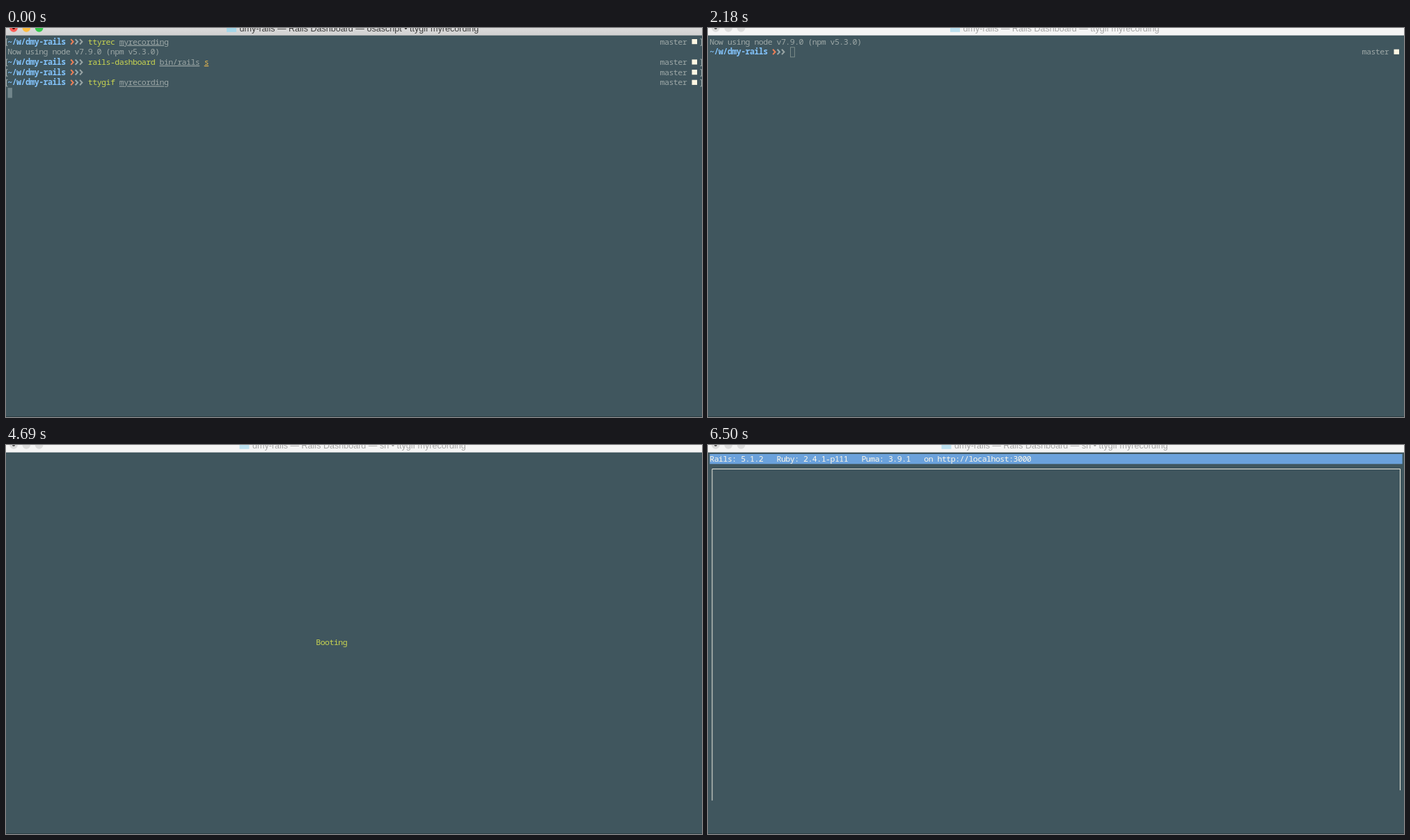
Write an HTML page that moves like this. It is 1000 px wide and 560 px high and loops after 8 s.

```html
<!DOCTYPE html>
<html lang="en">
<head>
<meta charset="utf-8">
<title>Terminal session</title>
<style>
  html, body { margin: 0; width: 100%; height: 100%; overflow: hidden; background: #40565e; }
  svg { display: block; width: 1000px; height: 560px; }
  text { white-space: pre; }
  #screen text {
    font: 500 11.6px "Noto Sans Mono", "DejaVu Sans Mono", monospace;
    letter-spacing: calc(6.42px - .6em);
  }
  #bar text { font: 12.57px "Liberation Sans", Arial, sans-serif; }
  .plain { fill: #9da8a7; }
  #screen .path { fill: #83c3fb; font-weight: 600; }
  .cmd { fill: #c9d551; }
  .arg { fill: #9da8a7; text-decoration: underline; }
  .opt { fill: #e9b84f; text-decoration: underline; }
  .head { fill: #fdf8ea; }
</style>
</head>
<body>
<svg viewBox="0 0 1000 560">
  <defs>
    <linearGradient id="chrome" x2="0" y2="1">
      <stop stop-color="#dadada"/><stop offset="1" stop-color="#d1d1d1"/>
    </linearGradient>
  </defs>
  <rect width="1000" height="560" fill="#40565e"/>
  <rect y="559" width="1000" height="1" fill="#2c3d43"/>
  <g id="screen"></g>
  <g id="bar"></g>
</svg>
<script>
const LOOP = 8000;
const COL = 6.42, ROW = 14.68, LEFT = 2.5, TOP = 12.7;
const x = col => LEFT + col * COL;
const y = row => TOP + row * ROW;

// Glyphs are set tight, so each starts a little left of its cell
const text = (col, row, cls, str) =>
  `<text class="${cls}" x="${x(col) - .25}" y="${y(row) + 11}">${str}</text>`;
const line = (d, color, width = 1) =>
  `<path d="${d}" fill="none" stroke="${color}" stroke-width="${width}"/>`;
const rect = (left, top, w, h, fill) =>
  `<rect x="${left}" y="${top}" width="${w}" height="${h}" fill="${fill}"/>`;

const chevron = (col, row, color) =>
  line(`M${x(col) + .8} ${y(row) + 3.4}l3.4 3.7l-3.4 3.7`, color, 2);
const prompt = row => text(0, row, 'path', '~/w/dmy-rails') +
  ['#ec7f57', '#93abb2', '#98a4a4'].map((c, i) => chevron(14 + i, row, c)).join('');
const branch = row => text(146, row, 'plain', 'master') +
  rect(985.5, y(row) + 3.3, 7.5, 7.2, '#fdf6e3');
const marks = row => line(
  `M2.5 ${y(row) + 3}H.5v9.5h2M997.5 ${y(row) + 3}h2v9.5h-2`, '#a3b0b0');
const fullPrompt = row => prompt(row) + branch(row) + marks(row);
const cursor = (col, row) =>
  `<rect x="${x(col) + .5}" y="${y(row) + .4}" width="5.8" height="14" fill="none" stroke="#82928f" stroke-width=".9"/>`;

const launch = row => text(18, row, 'cmd', 'rails-dashboard') +
  text(34, row, 'arg', 'bin/rails') + text(44, row, 'opt', 's');
const nodeInfo = row => text(0, row, 'plain', 'Now using node v7.9.0 (npm v5.3.0)');
const booting = dots => text(69, 18, 'cmd', 'Booting' + '.'.repeat(dots));

// The frame's sides are drawn row by row, the left one ahead of the right
const dashboard = (leftRows, rightRows) =>
  rect(LEFT, 13, 155 * COL, 14.3, '#6ba2dc') +
  text(0, 0, 'head', 'Rails: 5.1.2   Ruby: 2.4.1-p111   Puma: 3.9.1   on http://localhost:3000') +
  line(`M6 ${y(leftRows)}V34.5H994.5V${y(rightRows)}`, '#e9e8dd');

const history = fullPrompt(0) + text(18, 0, 'cmd', 'ttyrec') + text(25, 0, 'arg', 'myrecording') +
  nodeInfo(1) + fullPrompt(2) + launch(2) + fullPrompt(3) +
  fullPrompt(4) + text(18, 4, 'cmd', 'ttygif') + text(25, 4, 'arg', 'myrecording') +
  rect(LEFT, y(5), COL, 14.5, '#71858b');
const session = nodeInfo(0) + prompt(1);

// Title widths include the folder icon, so the pair stays centred
const titles = { osascript: 363, convert: 354, sh: 326, '': 301 };
const titleBar = (job, active) => {
  const start = 498.5 - titles[job] / 2;
  const lights = active ? ['#fc5b55', '#fdbd3f', '#35c94b'] : Array(3).fill('#dcdcdc');
  return rect(0, 0, 1000, 10.5, active ? 'url(#chrome)' : '#f5f5f5') +
    rect(0, 10, 1000, .8, active ? '#a9afb1' : '#bcc4c6') +
    lights.map((c, i) => `<circle cx="${11 + 18.3 * i}" r="5.8" fill="${c}"/>`).join('') +
    `<circle cx="11" r="2" fill="${active ? '#4d0a08' : '#555'}"/>` +
    rect(start, 0, 14, 5.8, active ? '#a5d6e8' : '#bde1f0') +
    `<text x="${start + 18.5}" y="4.8" fill="${active ? '#3f3f3f' : '#a5a5a5'}">` +
    `dmy-rails — Rails Dashboard — ${job && job + ' • '}ttygif myrecording</text>`;
};

// start time, running job, screen content
const scenes = [
  [0, 'osascript', history],
  [380, '', nodeInfo(0) + cursor(0, 1)],
  [480, 'convert', session + cursor(18, 1)],
  [2180, '', session + branch(1) + cursor(18, 1)],
  [3430, 'convert', session + branch(1) + launch(1) + cursor(45, 1)],
  [4100, 'convert', booting(0)],
  [4690, 'sh', booting(0)],
  [5180, 'convert', booting(1)],
  [5680, 'convert', booting(2)],
  [6190, 'sh', booting(3)],
  [6380, '', booting(4)],
  [6400, 'convert', dashboard(9, 8)],
  [6500, 'sh', dashboard(34, 33)],
];

const screenEl = document.getElementById('screen');
const barEl = document.getElementById('bar');
let shown;
function draw() {
  const t = performance.now() % LOOP;
  const scene = scenes.findLast(s => s[0] <= t);
  if (scene !== shown) {
    shown = scene;
    barEl.innerHTML = titleBar(scene[1], scene[0] === 0);
    screenEl.innerHTML = scene[2];
  }
  requestAnimationFrame(draw);
}
draw();
</script>
</body>
</html>
```
